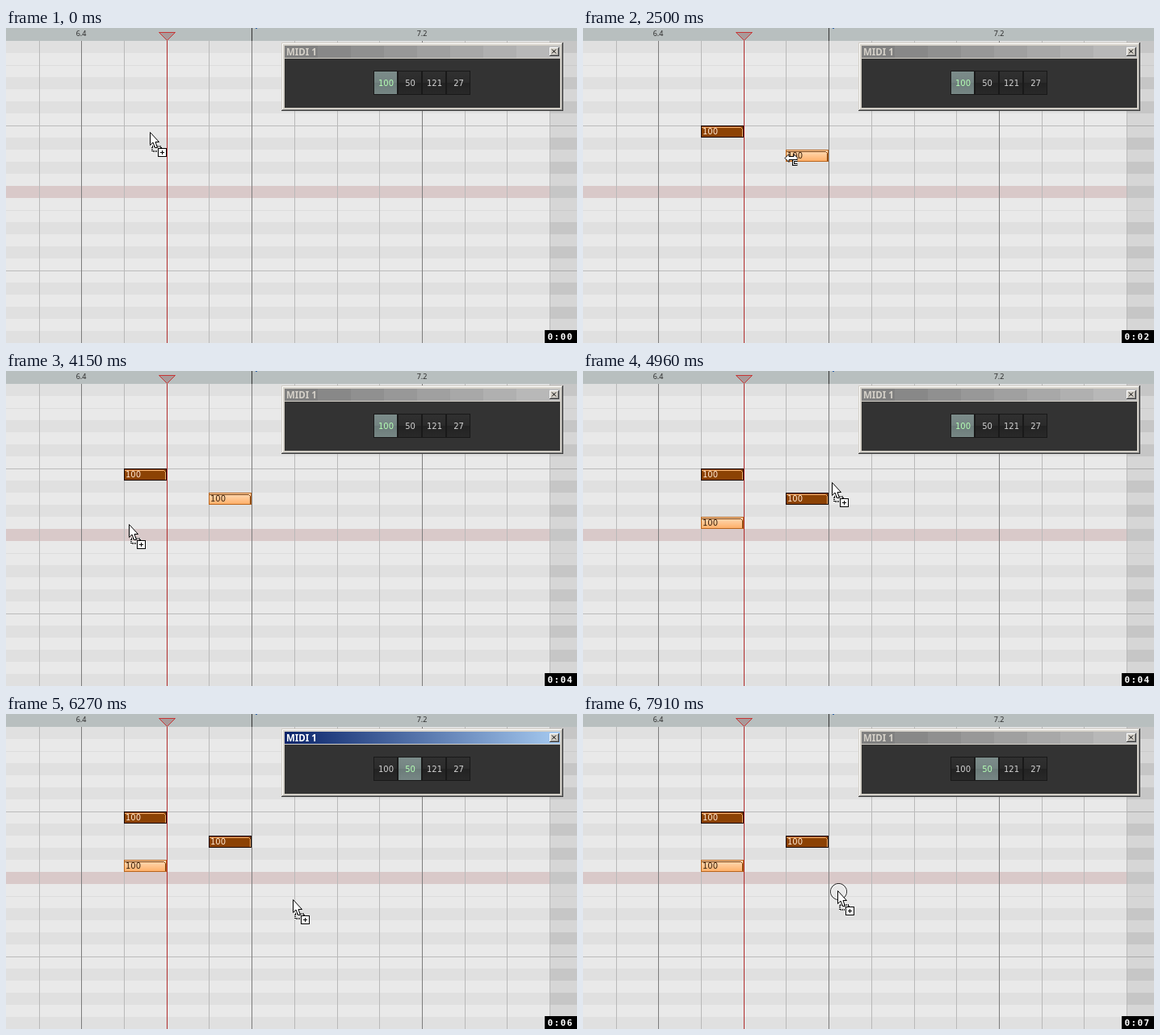
An HTML page for the animation above (8000 ms loop, 707 px wide and 391 px high).

```html
<!DOCTYPE html>
<html lang="en">
<head>
<meta charset="utf-8">
<title>Piano roll</title>
<style>
html, body { margin: 0; width: 100%; height: 100%; overflow: hidden; background: #e9e9e9; }
svg { display: block; width: 707px; height: 391px; }
rect { shape-rendering: crispEdges; }
text { font: 10px "DejaVu Sans", sans-serif; }
.mid { text-anchor: middle; }
.ruler { font: 9px "Open Sans", sans-serif; fill: #222; }
#title { font: bold 11.5px "Noto Sans", sans-serif; }
#clock { font: bold 11px "DejaVu Sans Mono", monospace; letter-spacing: 1.4px; fill: #fff; }
</style>
</head>
<body>
<svg viewBox="0 0 707 391">
  <defs>
    <linearGradient id="active"><stop stop-color="#0a246a"/><stop offset="1" stop-color="#a6caf0"/></linearGradient>
    <linearGradient id="on" x2="0" y2="1"><stop stop-color="#7c8c8a"/><stop offset=".5" stop-color="#748482"/><stop offset=".5" stop-color="#6b7b79"/><stop offset="1" stop-color="#778785"/></linearGradient>
    <linearGradient id="off" x2="0" y2="1"><stop stop-color="#303030"/><stop offset=".5" stop-color="#2b2b2b"/><stop offset=".5" stop-color="#222"/><stop offset="1" stop-color="#292929"/></linearGradient>
    <linearGradient id="warm" x2="0" y2="1"><stop stop-color="#ffcc96"/><stop offset="1" stop-color="#ffa250"/></linearGradient>
    <linearGradient id="pale" x2="0" y2="1"><stop stop-color="#ffdcb8"/><stop offset="1" stop-color="#ffb06a"/></linearGradient>
  </defs>
  <g id="grid"></g>
  <path d="M189.5 5.5H209.5L199.5 15.5z" fill="#a99a9a" stroke="#c83434"/>
  <g id="notes"></g>
  <g id="panel"></g>
  <g id="buttons"></g>
  <rect x="667" y="375" width="40" height="16"/>
  <text id="clock" x="670.5" y="387"></text>
  <g id="pointer">
    <g id="ring" fill="none"><circle cx="1.5" cy="1.5" r="10" stroke="#000"/><circle cx="1.5" cy="1.5" r="9" stroke="#fff"/></g>
    <g id="arrow">
      <g id="copy" stroke="#000">
        <rect x="3" y="18" width="11" height="6" fill="none" stroke="#fff" stroke-width="2"/>
        <rect x="3" y="18" width="11" height="6" fill="none" stroke-width="2" stroke-dasharray="1 1"/>
        <rect x="10.5" y="20.5" width="10" height="10" fill="#fff"/>
        <path d="M13 25.5h5M15.5 23v5"/>
      </g>
      <path d="M.5 .5V16.5L4 13L6.5 19.5H9.5L7 12.5H11.5z" fill="#fff" stroke="#000"/>
    </g>
    <g id="resize" fill="#fff" stroke="#000">
      <path d="M-8 .5l5-5v3h6v-3l5 5-5 5v-3h-6v3z"/>
      <path d="M7.5 3.5h-5v5h5" fill="none" stroke-width="3"/>
      <path d="M7.5 3.5h-5v5h5" fill="none" stroke="#fff"/>
    </g>
  </g>
</svg>
<script>
const $ = id => document.getElementById(id);

function add(parent, tag, attrs, text = '') {
  const e = document.createElementNS('http://www.w3.org/2000/svg', tag);
  for (const k in attrs) e.setAttribute(k, attrs[k]);
  e.textContent = text;
  return parent.appendChild(e);
}
const box = (parent, x, y, width, height, fill) => add(parent, 'rect', {x, y, width, height, fill});
const show = (e, on) => e.setAttribute('visibility', on ? 'visible' : 'hidden');
const colX = i => Math.floor(41.15 + 52.7 * i);
const rowY = i => 16 + 15 * i;

// Piano roll, top row is F#
const grid = $('grid');
for (let i = 0; i < 25; i++) {
  const y = rowY(i), key = i % 12, black = [0, 3, 5, 8, 10].includes(key);
  box(grid, 0, y, 674, 15, i === 12 ? '#d9c9c9' : black ? '#e0e0e0' : '#e9e9e9');
  box(grid, 674, y, 33, 15, black ? '#c6c6c6' : '#d6d6d6');
  if (key === 2) box(grid, 0, y, 707, 1, 'rgba(0,0,0,.05)');
  if (key === 7) box(grid, 0, y, 707, 1, 'rgba(0,0,0,.2)');
}
for (let i = 0; i < 13; i++) box(grid, colX(i), 16, 1, 375, i % 4 === 1 ? '#7c7c7c' : '#b9b9b9');
box(grid, colX(3), 16, 1, 375, '#b02c2c');
box(grid, 0, 0, 707, 16, '#b8bfbf');
box(grid, colX(5), 0, 1, 16, '#333');
box(grid, 309, 0, 2, 1, '#2f62a8');
add(grid, 'text', {x: 93, y: 10, class: 'ruler mid'}, '6.4');
add(grid, 'text', {x: 515, y: 10, class: 'ruler mid'}, '7.2');

// Window
const panel = $('panel');
function raised(x, y, w, h) {
  box(panel, x, y, w, h, '#404040');
  box(panel, x, y, w - 1, h - 1, '#fff');
  box(panel, x + 1, y + 1, w - 2, h - 2, '#808080');
  box(panel, x + 1, y + 1, w - 3, h - 3, '#d4d0c8');
}
box(panel, 341, 18, 349, 85, '#404040');
box(panel, 341, 18, 348, 84, '#d4d0c8');
box(panel, 342, 19, 347, 83, '#808080');
box(panel, 342, 19, 346, 82, '#fff');
box(panel, 343, 20, 345, 81, '#d4d0c8');
box(panel, 345, 38, 341, 61, '#333');
for (let i = 0; i < 9; i++) {
  const c = 128 + 8 * i, x = 345 + 41 * i;
  box(panel, x, 22, Math.min(41, 686 - x), 15, `rgb(${c},${c},${c})`);
}
const bar = box(panel, 345, 22, 341, 15, 'url(#active)');
const title = add(panel, 'text', {id: 'title', x: 347, y: 34}, 'MIDI 1');
raised(673, 24, 12, 11);
add(panel, 'path', {d: 'M676 26.5l5 5M681 26.5l-5 5', stroke: '#000'});

const buttons = ['100', '50', '121', '27'].map((label, i) => {
  const x = 455 + 30 * i, g = $('buttons');
  box(g, x, 53, 30, 30, '#191919');
  return {
    face: box(g, x + 1, 54, 28, 28),
    text: add(g, 'text', {x: x + 15.5, y: 71.5, class: 'mid'}, label)
  };
});

// Each note stays selected until the next one starts
function note(col, row, start, end, tint) {
  const g = add($('notes'), 'g', {transform: `translate(${colX(col)} ${rowY(row)})`});
  return {
    g, start, end, tint,
    edge: box(g, 0, 0, 53, 15),
    face: box(g, 1, 1, 51, 13),
    line: add(g, 'path', {d: 'M1 2.5H49.5L51.5 4.5V14', fill: 'none'}),
    text: add(g, 'text', {x: 2, y: 11}, '100')
  };
}
const notes = [note(2, 7, 940, 2500, 'warm'), note(4, 9, 2500, 4270, 'pale'), note(2, 11, 4270, Infinity, 'pale')];

// Pointer moves: start, end, x, y
const moves = [[120, 500, 153, 129], [940, 1250, 219, 148], [1680, 2100, 258, 161], [2500, 3620, 163, 198],
  [3900, 4125, 152, 190], [4570, 5250, 499, 73], [5475, 6250, 355, 230], [6250, 6690, 318, 222], [7125, 7500, 315, 219]];
const presses = [[660, 940], [2230, 2500], [4270, 4570], [5340, 5600], [7910, 8000]];

function pointer(t) {
  let x = 178, y = 129;
  for (const [start, end, toX, toY] of moves) {
    const k = Math.max(0, Math.min(1, (t - start) / (end - start)));
    x += (toX - x) * k;
    y += (toY - y) * k;
  }
  return [Math.round(x), Math.round(y)];
}

function draw(t) {
  const [x, y] = pointer(Math.floor(t / 125) * 125);
  const pressed = presses.some(([a, b]) => t >= a && t < b);
  const onEdge = !pressed && notes.some(n => t >= n.start && t < n.start + 120);
  const focus = t >= 5340 && t < 7910;

  show(bar, focus);
  title.setAttribute('fill', focus ? '#fff' : '#d4d0c8');
  buttons.forEach((b, i) => {
    const lit = i === 0 ? t < 5600 : i === 1 && t >= 5340;
    b.face.setAttribute('fill', lit ? 'url(#on)' : 'url(#off)');
    b.text.setAttribute('fill', lit ? '#b4ffb4' : '#d2d2d2');
  });
  for (const n of notes) {
    const dim = t >= n.end;
    show(n.g, t >= n.start);
    n.edge.setAttribute('fill', dim ? '#180800' : '#b8641c');
    n.face.setAttribute('fill', dim ? '#8c4204' : `url(#${n.tint})`);
    n.line.setAttribute('stroke', dim ? '#f4b070' : '#7a3c08');
    n.text.setAttribute('fill', dim ? '#ffe8d4' : '#3a2410');
  }
  $('clock').textContent = '0:0' + Math.floor(t / 1000);

  $('pointer').setAttribute('transform', `translate(${x} ${y})`);
  show($('ring'), pressed);
  show($('arrow'), !onEdge);
  show($('resize'), onEdge);
  const overPanel = x >= 341 && x < 690 && y >= 18 && y < 103;
  $('copy').style.display = overPanel ? 'none' : '';
}

const begin = performance.now();
function loop() {
  draw((performance.now() - begin) % 8000);
  requestAnimationFrame(loop);
}
loop();
</script>
</body>
</html>
```
